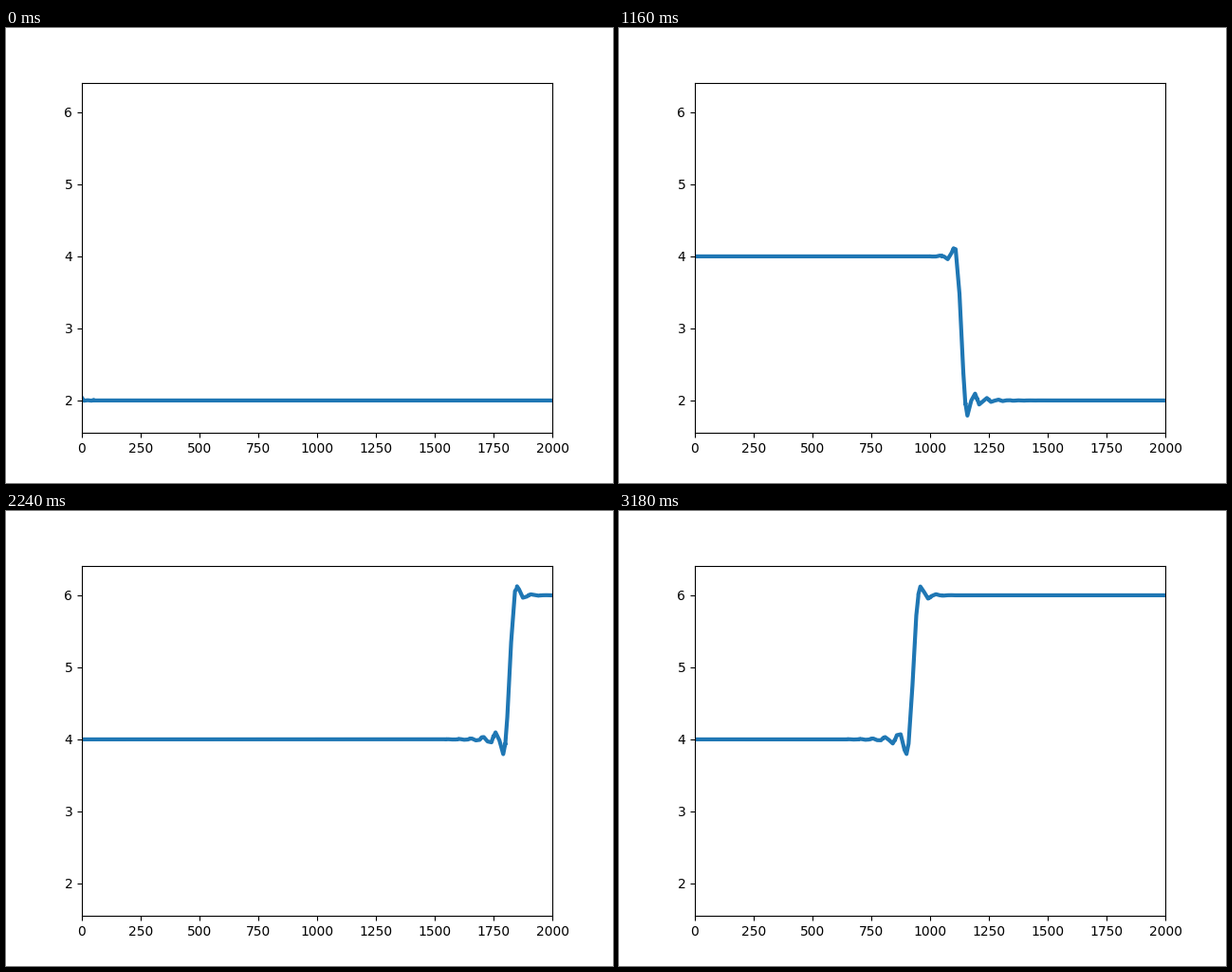
Write a matplotlib script that moves like this. It is 640 by 480 pixels and loops after 3200 ms.

```python
import numpy as np
import matplotlib.pyplot as plt
from matplotlib.animation import FuncAnimation
from numpy.polynomial import legendre

# Pressure wave in a closed pipe: discontinuous Galerkin, upwind flux
LENGTH, CELLS, ORDER = 2000.0, 40, 4
FRAMES, SUBSTEPS = 160, 10
SPEED_OUT, SPEED_BACK = 19.51, 18.95  # distance per frame
BASE, JUMP = 2.0, 2.0

h = LENGTH / CELLS
q = np.sqrt(3 / 7)
r = np.array([-1, -q, 0, q, 1])  # Legendre-Gauss-Lobatto nodes

norm = np.sqrt(np.arange(ORDER + 1) + 0.5)
V = legendre.legvander(r, ORDER) * norm
Vr = np.column_stack([
    legendre.legval(r, legendre.legder(np.eye(ORDER + 1)[j])) * norm[j]
    for j in range(ORDER + 1)
])
D = Vr @ np.linalg.inv(V)
lift = (V @ V.T)[:, 0]
x = (np.arange(CELLS)[:, None] + (r + 1) / 2) * h


def advect(w, inflow, speed):
    upwind = np.concatenate([[inflow], w[:-1, -1]])
    return 2 * speed / h * (np.outer(upwind - w[:, 0], lift) - w @ D.T)


def rhs(s):
    out, back = s  # the returning wave is stored from the wall inwards
    return np.array([
        advect(out, JUMP, SPEED_OUT),
        advect(back, out[-1, -1], SPEED_BACK),
    ])


def rk4(s, dt):
    k1 = rhs(s)
    k2 = rhs(s + dt / 2 * k1)
    k3 = rhs(s + dt / 2 * k2)
    k4 = rhs(s + dt * k3)
    return s + dt / 6 * (k1 + 2 * k2 + 2 * k3 + k4)


def solve():
    s = rk4(np.zeros((2, CELLS, ORDER + 1)), 0.002)
    history = []
    for _ in range(FRAMES):
        history.append((BASE + s[0] + s[1, ::-1, ::-1]).ravel())
        for _ in range(SUBSTEPS):
            s = rk4(s, 1 / SUBSTEPS)
    return history


pressure = solve()

fig, ax = plt.subplots(figsize=(6.4, 4.8), dpi=100)
ax.set_xlim(0, LENGTH)
ax.set_ylim(1.549, 6.412)
line, = ax.plot(x.ravel(), pressure[0], lw=3)


def update(i):
    line.set_ydata(pressure[i])
    return line,


anim = FuncAnimation(fig, update, frames=FRAMES, interval=20,
                     repeat=True, repeat_delay=0)
plt.show()
```
